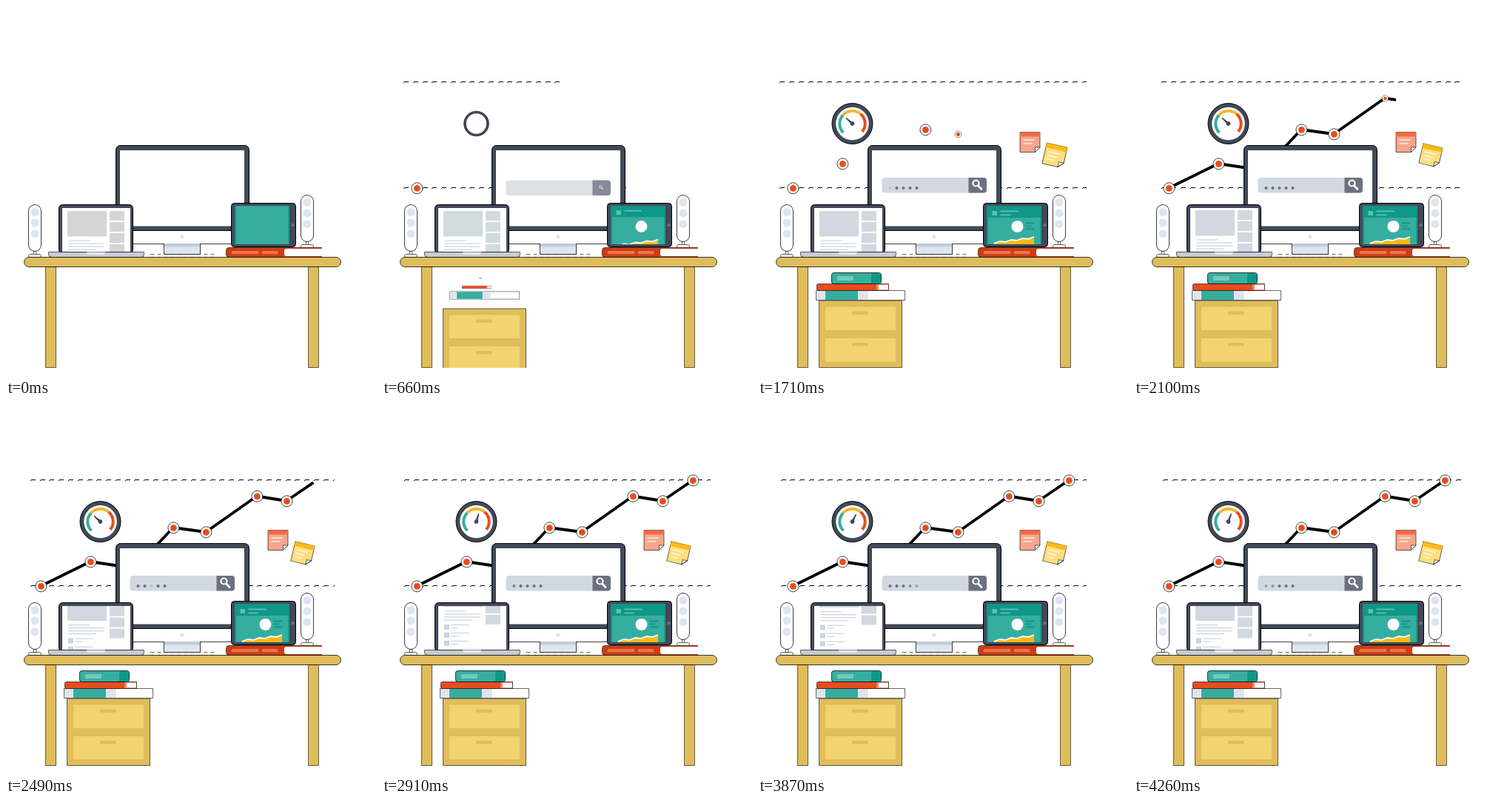
An HTML page with a canvas that plays this animation: 500x500 px, repeating every 4.29 s.

```html
<!DOCTYPE html>
<html lang="en">
<head>
<meta charset="utf-8">
<title>Desk</title>
<style>
html, body { margin: 0; width: 100%; height: 100%; overflow: hidden; background: #fff; }
canvas { display: block; width: 100vw; height: 100vh; }
</style>
</head>
<body>
<canvas id="stage" width="500" height="500"></canvas>
<script>
const c = document.getElementById('stage').getContext('2d');
const LOOP = 4290, STEP = 30;
const DARK = '#414959', WOOD = '#dfbd5b', DRAWER = '#f4d26e', TEAL = '#35ae9f', DEEP = '#0f9787',
      RED = '#e84c1e', GREY = '#d1d8df', PALE = '#dfe5ef', SLATE = '#6b7180', YELLOW = '#fcb915',
      MINT = '#5fc0b4', FAINT = '#cdd4dc', INK = '#000000c0', EDGE = '#00000099';

// Easing: each takes the time and returns 0 to 1 (pop overshoots on the way).
const part = (t, a, b) => Math.min(1, Math.max(0, (t - a) / (b - a)));
const smooth = (t, a, b) => { const p = part(t, a, b); return p * p * (3 - 2 * p); };
const out = (t, a, b, power) => 1 - (1 - part(t, a, b)) ** power;
const pop = (t, start) => { const q = part(t, start, start + 850) - 1; return 1 + 2.7 * q ** 3 + 1.7 * q * q; };

function paint(fill, line) {
  if (fill) { c.fillStyle = fill; c.fill(); }
  if (line) { c.strokeStyle = line; c.lineWidth = 1; c.stroke(); }
}
function box(x, y, w, h, fill, r = 0, line) {
  c.beginPath();
  c.roundRect(x, y, w, h, r);
  paint(fill, line);
}
function disc(x, y, r, fill, line) {
  c.beginPath();
  c.arc(x, y, r, 0, 7);
  paint(fill, line);
}
function poly(points, fill, line) {
  c.beginPath();
  points.forEach(p => c.lineTo(...p));
  c.closePath();
  paint(fill, line);
}
function path(points, color, width, cap = 'butt') {
  c.beginPath();
  points.forEach(p => c.lineTo(...p));
  c.strokeStyle = color;
  c.lineWidth = width;
  c.lineCap = cap;
  c.lineJoin = 'round';
  c.stroke();
}
function arc(x, y, r, from, to, color, width) {
  c.beginPath();
  c.arc(x, y, r, (from - 90) * Math.PI / 180, (to - 90) * Math.PI / 180);
  c.strokeStyle = color;
  c.lineWidth = width;
  c.stroke();
}
// Draws around a centre with scale and turn.
function at(x, y, scale, turn, draw) {
  if (scale <= .001) return;
  c.save();
  c.translate(x, y);
  c.rotate(turn * Math.PI / 180);
  c.scale(scale, scale);
  draw();
  c.restore();
}
function clipped(x, y, w, h, draw) {
  c.save();
  c.beginPath();
  c.rect(x, y, w, h);
  c.clip();
  draw();
  c.restore();
}

function dashes(y, t, grow) {
  const gap = 12.77, end = 30 + 414 * grow;
  const shift = Math.max(0, t - 1468) * .0538 % gap;
  c.fillStyle = '#000';
  for (let x = 30 + shift; x < end; x += gap) {
    const left = Math.round(x);
    c.fillRect(left, y, Math.min(6, end - left), 1);
    c.fillRect(left - 1, y + 1, 1, 1);
  }
}

const POINTS = [[47, 246], [114, 213], [174, 222], [226, 167], [270, 173], [339, 124.5], [379, 131], [420, 103]];
function graph(t) {
  const drawn = 460 * out(t, 640, 2790, 1.3);
  const line = [POINTS[0]], scales = [smooth(t, 400, 640)];
  let far = 0;
  for (let i = 1; i < POINTS.length; i++) {
    const [ax, ay] = POINTS[i - 1], [bx, by] = POINTS[i];
    const size = Math.hypot(bx - ax, by - ay);
    const p = part(drawn, far, far + size);
    if (p) line.push([ax + (bx - ax) * p, ay + (by - ay) * p]);
    far += size;
    scales.push(part(drawn, far, far + 28));
  }
  // The line blinks off for a moment.
  const hidden = t >= 1530 && t < 1890;
  if (!hidden) path(line, '#000', 3.8);
  POINTS.forEach(([x, y], i) => at(x + .4, y + .3, scales[i], 0, () => {
    disc(0, 0, 7.5, '#fff', INK);
    disc(0, 0, 4.4, RED);
  }));
}

function gauge(t) {
  at(127.5, 159, pop(t, 520), 0, () => {
    disc(0, 0, 27.5, DARK, '#000');
    disc(0, 0, 22.3, '#fff');
    const open = smooth(t, 690, 950);
    ['#35ae9f', '#f0b92c', RED].forEach((color, i) => {
      const from = -135 + 88 * i;
      if (open) arc(0, 0, 17.2, from, from + 88 * open, color, 4);
    });
    const turn = -135 + 87 * smooth(t, 1080, 1600) + 83 * smooth(t, 2490, 3100) - 15 * smooth(t, 3500, 4200);
    at(0, 0, smooth(t, 750, 950), turn, () => {
      poly([[-1.7, 0], [-.7, -11.5], [.7, -11.5], [1.7, 0]], DARK);
      disc(0, 0, 2.8, DARK);
    });
  });
}

function note(x, y, scale, turn, paper, top, ink, lines) {
  at(x, y, scale, turn, () => {
    poly([[-13.5, -13.5], [13.5, -13.5], [13.5, 7], [7, 13.5], [-13.5, 13.5]], paper, EDGE);
    box(-13.5, -13.5, 27, 6, top);
    poly([[7, 13.5], [7, 7], [13.5, 7]], '#fff', EDGE);
    for (let i = 0; i < lines; i++) box(-9, -4 + 4.8 * i, 15 - 3 * i, 1.8, ink);
  });
}

function monitor(t) {
  box(148.5, 292.5, 180, 29, '#fff', 4, INK);
  box(148.5, 188.5, 180, 115, DARK, [6, 6, 0, 0], '#000');
  box(154, 195, 168, 102.5, '#fff');
  disc(238, 312, 2.6, '#dde1e6');
  box(193.5, 335.5, 89, 4, '#fff', 2);
  c.setLineDash([5, 4]);
  box(193.5, 335.5, 89, 4, null, 2, EDGE);
  c.setLineDash([]);
  box(213.5, 321.5, 49, 14, PALE, 0, INK);
  box(214, 321, 48, 4.5, '#c3cbd7');
  search(t);
}

function search(t) {
  const show = smooth(t, 480, 740);
  if (!show) return;
  c.save();
  c.globalAlpha = show;
  c.translate(0, 16 * (1 - show));
  box(167.5, 232, 141.5, 20.5, GREY, 4);
  box(284.5, 232, 24.5, 20.5, SLATE, [0, 4, 4, 0]);
  at(296, 241.5, smooth(t, 560, 780), 0, () => {
    arc(-1.5, -2, 4, 0, 360, '#fff', 2.2);
    path([[1.5, 1.2], [6, 6]], '#fff', 2.8, 'round');
  });
  const wave = t < 1650 ? -9 : (t - 1650) % 630 / 75 - .8;
  for (let i = 0; i < 5; i++) {
    c.globalAlpha = show * Math.min(1, .2 + .8 * Math.abs(wave - i));
    disc(178.5 + 9 * i, 246, 2.1 * smooth(t, 620 + 60 * i, 760 + 60 * i), SLATE);
  }
  c.restore();
}

function laptop(t) {
  const tint = t < 480 ? '#d5d5d5' : t < 780 ? '#d1dbdb' : GREY;
  const scroll = -38 * (smooth(t, 2000, 3000) - smooth(t, 3750, 4750));
  box(71.5, 268.5, 100, 66, DARK, 5, '#000');
  clipped(76, 273, 92, 59, () => {
    box(76, 273, 92, 59, '#fff');
    c.translate(0, scroll);
    box(83, 277, 53, 34.5, tint);
    for (let i = 0; i < 4; i++) {
      box(140, 277 + 15 * i, 20, 13, tint);
      box(84, 316.5 + 4 * i, i % 3 ? 49 : 29 + 3 * i, 1.2, FAINT);
    }
    for (let y = 335; y < 365; y += 11) {
      box(84, y, 7, 7, FAINT);
      box(93, y, 24, 1.2, FAINT);
      box(93, y + 4, 10, 1.2, FAINT);
    }
  });
  box(57.5, 332.5, 129, 7, '#c6ccd6', [0, 0, 4, 4], EDGE);
  box(109, 332.5, 25, 3.5, '#e3e7ed', [0, 0, 3, 3]);
}

function tablet(t) {
  box(304.5, 266.5, 87, 59, DARK, 4, '#000');
  disc(387.5, 296, 2.3, SLATE);
  box(309, 270, 74, 52, DEEP);
  box(311, 270, 70.5, 52, TEAL);
  clipped(309, 270, 74, 52, () => {
    const head = smooth(t, 450, 690), rise = smooth(t, 480, 760);
    if (head) {
      const y = 254 + 16 * head;
      box(309, y, 74, 16, DEEP);
      box(316.5, y + 7, 6.5, 6, MINT);
      box(327.5, y + 6.5, 24.5 * head, 1.8, MINT);
      box(327.5, y + 11.5, 13.5 * smooth(t, 640, 800), 1.8, MINT);
    }
    disc(350.5, 298, 8 * smooth(t, 450, 670), '#fff');
    for (let i = 0; i < 3; i++) {
      box(361.5, 292.5 + 4 * i, (i % 2 ? 8 : 12) * smooth(t, 680 + 60 * i, 860 + 60 * i), 1.8, DEEP);
    }
    if (rise) {
      const top = [];
      for (let i = 0; i < 8; i++) top.push([319 + 54 * i / 7, 332 - 12 * rise - i + (i % 2 ? -1 : .8)]);
      poly([...top, [373, 323], [319, 323]], YELLOW);
      path(top, '#fff', 1.8);
    }
  });
}

function speaker(x, y) {
  box(x + 7.5, y + 62.5, 3, 6, '#fff', 0, EDGE);
  box(x + .5, y + 67.5, 17, 4, '#fff', 2, EDGE);
  box(x + .5, y + .5, 17, 63, '#fff', 8.5, INK);
  for (let i = 0; i < 3; i++) disc(x + 9, y + 10.5 + 14.6 * i, 5.5, PALE);
}

function desk() {
  [53.5, 408.5].forEach(x => box(x, 352.5, 14, 136, WOOD, 0, EDGE));
  box(24.5, 339.5, 428, 13, WOOD, 6.5, INK);
}

function cabinet(t) {
  const drop = 92 * (1 - out(t, 330, 980, 3));
  clipped(80, 350, 120, 139, () => {
    c.translate(0, drop);
    box(82.5, 398, 112, 90.5, WOOD, 0, EDGE);
    [406.5, 449].forEach(y => {
      box(91, y, 95, 31.5, DRAWER);
      box(127, y + 6, 22, 4.5, WOOD, 2);
    });
  });
}

function pile(t) {
  at(138.5, 391, pop(t, 460), 0, () => {
    box(-60, -6.5, 120, 13, '#fff', 0, EDGE);
    box(-59.5, -6, 70, 12, PALE);
    box(-47.5, -6, 44, 12, TEAL);
  });
  at(128, 380, pop(t, 575), 0, () => {
    box(-48.5, -4.5, 97, 9, RED, [2, 0, 0, 2], EDGE);
    box(32, -4, 3, 8, '#f08a68');
    box(35, -3.5, 13, 7, '#fff');
  });
  at(133, 368, pop(t, 650), 0, () => {
    box(-33.5, -7.5, 67, 15, TEAL, 3, INK);
    box(20, -7, 13, 14, DEEP, [0, 3, 3, 0]);
    box(-26, -3, 22, 6, '#78c8be');
  });
}

function redBook() {
  box(297.5, 326.5, 129, 13, '#cf3c14', [4, 0, 0, 4], EDGE);
  box(376, 328, 51, 10, '#fff', [3, 0, 0, 3]);
  box(304.5, 331, 37, 4.3, '#ea7650', 2);
  box(345.5, 331, 22, 4.3, '#ea7650', 2);
}

function draw(t) {
  c.fillStyle = '#fff';
  c.fillRect(0, 0, 500, 500);
  dashes(102, t, out(t, 300, 1500, 2));
  dashes(245, t, out(t, 200, 1500, 3));
  graph(t);
  gauge(t);
  note(367.5, 184, pop(t, 815), 0, '#f5a68d', '#ee6c48', '#fde3da', 2);
  note(401, 202, pop(t, 1045), 13, '#fddf80', YELLOW, '#fff4cf', 3);
  monitor(t);
  laptop(t);
  redBook();
  tablet(t);
  speaker(30, 268);
  speaker(398, 255);
  cabinet(t);
  pile(t);
  desk();
}

const start = performance.now();
function tick() {
  const t = (performance.now() - start) % LOOP;
  draw(Math.floor(t / STEP) * STEP);
  requestAnimationFrame(tick);
}
tick();
</script>
</body>
</html>
```
